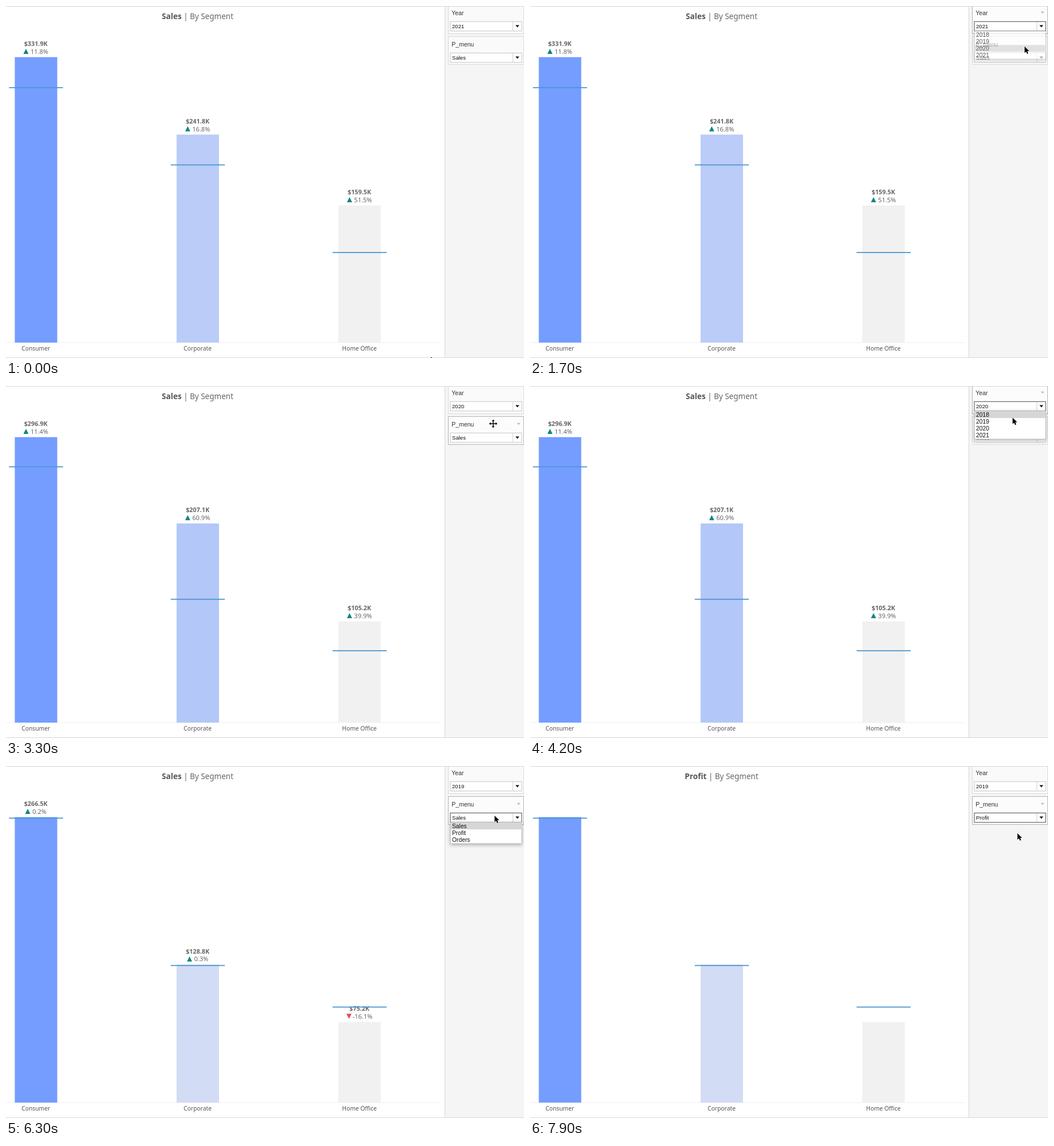
Recreate the animation shown at these times as an HTML page. Size 907x617 px, loop 8 s.

```html
<!DOCTYPE html>
<html lang="en">
<head>
<meta charset="utf-8">
<title>Sales by segment</title>
<style>
html, body { margin: 0; width: 100%; height: 100%; overflow: hidden; background: #fff; }
svg { display: block; width: 100vw; height: 100vh; }
.chart { font-family: "Noto Sans", "Open Sans", sans-serif; fill: #666; }
.chart text { text-anchor: middle; }
.title { font-size: 13.55px; font-weight: 300; }
.title tspan { font-weight: 600; fill: #555; }
.axis { font-size: 10.3px; fill: #555; }
.value { font-size: 10.8px; font-weight: 700; }
.pct { font-size: 11px; }
.side { font-family: "Liberation Sans", Arial, sans-serif; fill: #111; }
.head { font-size: 10.5px; fill: #333; }
.pick { font-size: 9.6px; }
.item { font-size: 10.3px; }
.popup { filter: drop-shadow(0 2px 3px rgba(0, 0, 0, .3)); }
</style>
</head>
<body>
<svg id="stage" viewBox="0 0 907 617" preserveAspectRatio="none"></svg>
<script>
const LOOP = 8000, BASE = 590, FULL = 500.4, ROW = 12.1, GAP = 55;
const stage = document.getElementById('stage');

function add(parent, tag, attrs = {}, text) {
  const el = document.createElementNS('http://www.w3.org/2000/svg', tag);
  set(el, attrs);
  if (text !== undefined) el.textContent = text;
  parent.append(el);
  return el;
}
function set(el, attrs) {
  for (const k in attrs) el.setAttribute(k, attrs[k]);
}
const show = (el, on) => set(el, { visibility: on ? 'visible' : 'hidden' });
const rect = (p, x, y, width, height, fill, stroke = 'none') =>
  add(p, 'rect', { x, y, width, height, fill, stroke });
const mix = (a, b, k) => a + (b - a) * k;
const clamp = v => Math.min(1, Math.max(0, v));
const ease = v => v * v * (3 - 2 * v);

const segments = ['Consumer', 'Corporate', 'Home Office'];
// Thousands per year, newest first; each year is compared with the next row
const sales = [
  [331.9, 241.84, 159.46], [296.9, 207.12, 105.24],
  [266.5, 128.76, 75.2], [265.97, 128.42, 89.6]
];
const names = ['Year', 'P_menu'];
const options = [['2018', '2019', '2020', '2021'], ['Sales', 'Profit', 'Orders']];

// Each visit to a dropdown: press the field, list opens and closes, chart redraws
const visits = [
  { list: 0, press: 900, open: 900, close: 1700, redraw: 2400, pick: '2020' },
  { list: 0, press: 3800, open: 3800, close: 4600, redraw: 5400, pick: '2019' },
  { list: 1, press: 5900, open: 6300, close: 7400, redraw: 8000, pick: 'Profit' }
];
// Pointer moves: start, end, x, y
const moves = [
  [0, 900, 868, 45], [1100, 1400, 866, 71], [2000, 2300, 854, 69], [3200, 3700, 845, 40],
  [4000, 4300, 845, 61], [4800, 5400, 857, 82], [5400, 5800, 855.5, 87], [6400, 6900, 853.5, 118]
];

function pointerAt(t) {
  let x = 744, y = 615;
  for (const [start, end, toX, toY] of moves) {
    const k = ease(clamp((t - start) / (end - start)));
    x = mix(x, toX, k);
    y = mix(y, toY, k);
  }
  return [x, y];
}

// Chart
rect(stage, 0, 0, 907, 617, '#fff');
const chart = add(stage, 'g', { class: 'chart' });
rect(chart, 0, 589.5, 762, 1, '#f0f0f0');
const title = add(chart, 'text', { class: 'title', x: 335.5, y: 22.8 });
const metric = add(title, 'tspan');
title.append(' | By Segment');

const bars = segments.map((name, i) => {
  const mid = 52.2 + i * 283.3;
  add(chart, 'text', { class: 'axis', x: mid, y: 604.3 }, name);
  const bar = rect(chart, mid - 36.8, 0, 74.3, 0);
  const label = add(chart, 'g');
  const value = add(label, 'text', { class: 'value', x: mid });
  const pct = add(label, 'text', { class: 'pct' });
  const mark = add(label, 'path');
  const line = rect(chart, mid - 47, 0, 94.7, 1.8, '#4e96cf');
  return { mid, bar, label, value, pct, mark, line };
});

// Side panel
const side = add(stage, 'g', { class: 'side' });
rect(side, 768, 0, 139, 617, '#f5f5f5');
rect(side, 768, 0, 1, 617, '#d6d6d6');
for (const y of [0, 616]) rect(stage, 0, y, 907, 1, '#d6d6d6');

const panels = names.map((name, i) => {
  const y = i * GAP;
  const box = rect(side, 774.5, y - i - .5, 132, 49, '#fafafa');
  add(side, 'text', { class: 'head', x: 780.3, y: y + 15.7 }, name);
  const caret = add(side, 'path', { d: `M894.5 ${y + 9.8}h6l-3 3.4z`, fill: '#b8b8b8' });
  const field = rect(side, 778, y + 27.3, 125, 16.5, '#fff');
  rect(side, 887, y + 28, 1, 15, '#d0d0d0');
  add(side, 'path', { d: `M892 ${y + 33.4}h6.8l-3.4 4.2z`, fill: '#111' });
  const text = add(side, 'text', { class: 'pick', x: 781, y: y + 38.9 });
  return { box, caret, field, text };
});

const lists = options.map((items, i) => {
  const top = 43.8 + i * GAP;
  const g = add(side, 'g', { class: 'popup' });
  rect(g, 778.3, top, 124.6, items.length * ROW + .8, '#fff', '#c4c4c4');
  const mark = rect(g, 778.8, 0, 123.6, ROW, '#d6d6d6');
  items.forEach((s, n) =>
    add(g, 'text', { class: 'item', x: 781, y: top + 9.8 + n * ROW }, s));
  return { g, mark, top };
});

// Pointers
const arrow = add(stage, 'path', {
  d: 'M0 0V11.2L2.6 8.8L4.4 12.8L6.4 11.9L4.7 8H8.1Z',
  fill: '#000', stroke: '#fff', 'stroke-width': .9, 'paint-order': 'stroke'
});
const mover = add(stage, 'g');
const blades = [0, 90, 180, 270].map(a =>
  `<path transform="rotate(${a})" d="M-.7 0V-4.4H-2.5L0 -7.2L2.5 -4.4H.7V0Z"/>`).join('');
mover.innerHTML = `<g stroke="#fff" stroke-width="1.4">${blades}</g><g>${blades}</g>`;

// Heights, reference heights and fills of one year's bars
function yearLook(row) {
  const now = sales[row], max = Math.max(...now), min = Math.min(...now);
  return now.map((v, i) => {
    const k = ((v - min) / (max - min)) ** 1.1;
    return {
      h: v / max * FULL,
      ref: sales[row + 1][i] / max * FULL,
      fill: [mix(241, 117, k), mix(241, 157, k), mix(241, 255, k)]
    };
  });
}

function drawBars(t) {
  const pos = visits.reduce((sum, v) =>
    sum + (v.list ? 0 : ease(clamp((t - v.redraw) / 200))), 0);
  const year = Math.floor(pos), k = pos - year;
  const from = yearLook(year), to = yearLook(Math.ceil(pos));
  const busy = visits.some(v => t >= v.redraw - 100 && t < v.redraw + 200);

  bars.forEach((b, i) => {
    const part = key => mix(from[i][key], to[i][key], k);
    const top = BASE - part('h');
    const fill = from[i].fill.map((c, n) => Math.round(mix(c, to[i].fill[n], k)));
    set(b.bar, { y: top, height: BASE - top, fill: `rgb(${fill})` });
    set(b.line, { y: BASE - part('ref') - .1 });

    show(b.label, !busy);
    const now = sales[year][i], growth = (now / sales[year + 1][i] - 1) * 100;
    const up = growth > 0, gap = up ? 3.6 : 2;
    b.value.textContent = `$${now.toFixed(1)}K`;
    b.pct.textContent = `${growth.toFixed(1)}%`;
    const w = b.pct.getComputedTextLength();
    const left = b.mid - (9 + gap + w) / 2;
    set(b.value, { y: top - 19.6 });
    set(b.pct, { x: left + 9 + gap + w / 2, y: top - 5.8 });
    set(b.mark, {
      d: up ? `M${left} ${top - 5.6}h9l-4.5 -9z` : `M${left} ${top - 14.6}h9l-4.5 9z`,
      fill: up ? '#0a8780' : '#ec4c53'
    });
  });
}

function draw(t) {
  drawBars(t);
  const [x, y] = pointerAt(t);
  const texts = ['2021', 'Sales'];
  let focus = -1, shown = -1, last = -1, alpha = 0;
  for (const v of visits) {
    if (t >= v.close + 400) texts[v.list] = v.pick;
    if (t >= v.press && t < v.redraw) focus = v.list;
    if (t >= v.open) last = v.list;
    if (t >= v.open && t < v.close + 200) {
      shown = v.list;
      alpha = clamp(1 - (t - v.close + 100) / 300);
    }
  }
  metric.textContent = texts[1];

  let hover = last;
  if (shown < 0 && x > 774 && y < 104) hover = y < 51 ? 0 : 1;
  panels.forEach((p, i) => {
    p.text.textContent = texts[i];
    show(p.caret, hover === i);
    set(p.box, {
      fill: hover === i ? '#fcfcfc' : '#fafafa',
      stroke: hover === i ? '#b4b4b4' : '#dadada'
    });
    set(p.field, { stroke: focus === i ? '#4a4a4a' : '#c6c6c6' });
  });

  // The marked row follows the pointer, or rests on the current choice
  lists.forEach((l, i) => {
    show(l.g, shown === i);
    const row = y < l.top ? options[i].indexOf(texts[i]) : Math.floor((y - l.top) / ROW);
    set(l.g, { opacity: alpha });
    set(l.mark, { y: l.top + .3 + row * ROW });
  });

  const headY = y > 54 ? y - GAP : y;
  const onHead = shown < 0 && x > 774 && headY < 26.7;
  for (const el of [arrow, mover]) {
    set(el, { transform: `translate(${x} ${y})` });
    show(el, onHead === (el === mover));
  }
}

// The picture advances ten times a second
const begin = performance.now();
let drawn = -1;
function tick() {
  const t = Math.floor((performance.now() - begin) % LOOP / 100) * 100;
  if (t !== drawn) draw(drawn = t);
  requestAnimationFrame(tick);
}
tick();
</script>
</body>
</html>
```
